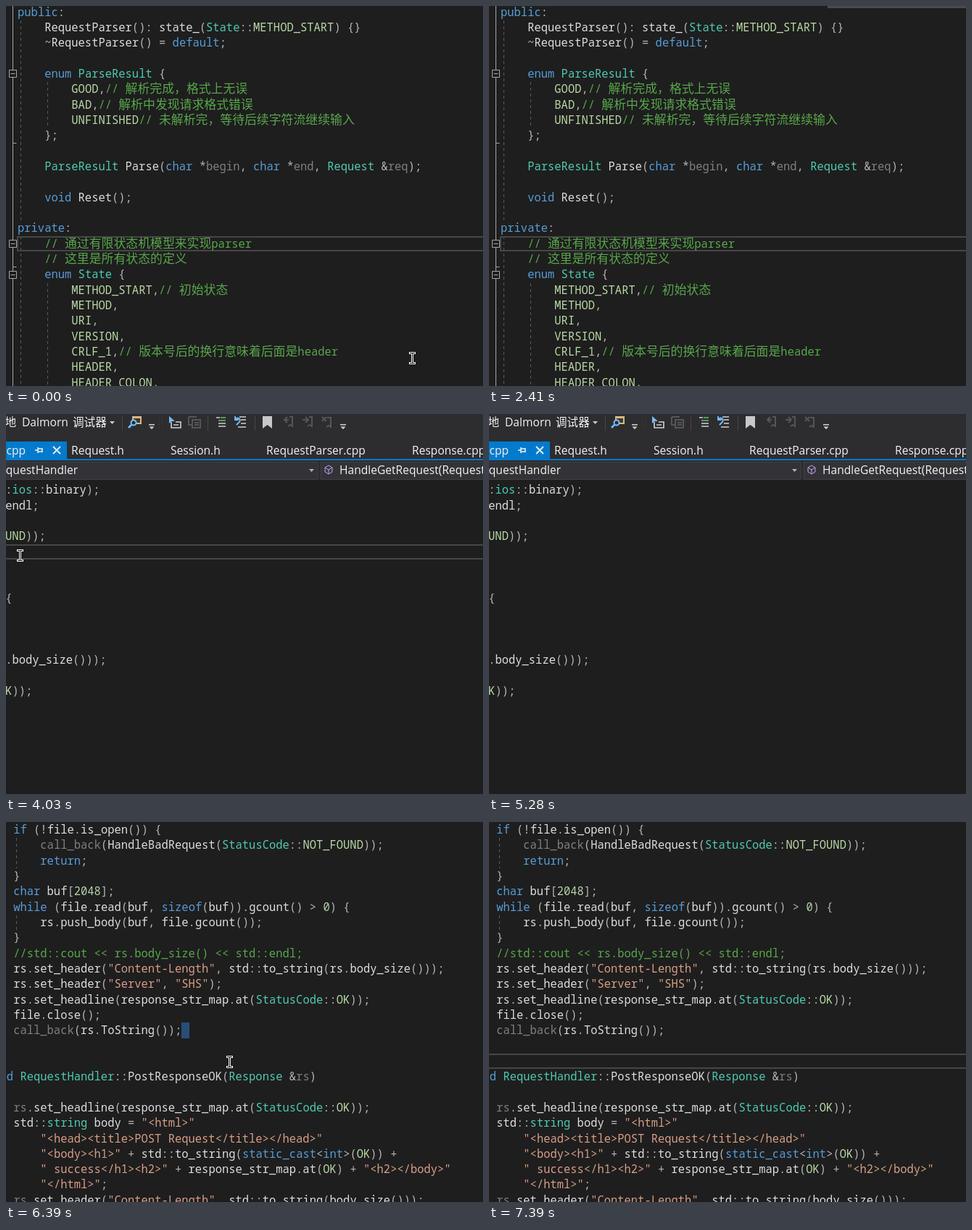
Animation, 658 px wide and 525 px high, one loop 7.94 s. Source, as an HTML page:

```html
<!DOCTYPE html>
<html lang="zh-CN">
<head>
<meta charset="utf-8">
<title>Code editor tour</title>
<style>
  html, body { margin: 0; width: 100%; height: 100%; overflow: hidden; background: #1e1e1e; }
  svg { display: block; }
  .code text { font: 15.48px "Noto Sans Mono", "DejaVu Sans Mono", monospace; fill: #dcdcdc; }
  .code .cjk { font: 16.87px "Noto Sans CJK SC", "Noto Sans CJK JP", sans-serif; }
  .comment { fill: #57a64a; }
  .string { fill: #d69d85; }
  .param { fill: #7f7f7f; }
  .keyword { fill: #569cd6; }
  .number { fill: #b5cea8; }
  .constant { fill: #b8d7a3; }
  .type { fill: #4ec9b0; }
  .op { fill: #b4b4b4; }
  .guide { stroke: #5c5c5c; stroke-dasharray: 4 4; }
  .fold { stroke: #a5a5a5; fill: #1e1e1e; }
  .row { fill: none; stroke: #464646; stroke-width: 2; }
  .ui text { font: 15.6px "Open Sans", "Noto Sans CJK SC", "Noto Sans CJK JP", sans-serif; fill: #f1f1f1; }
  .dim { fill: none; stroke: #55555a; stroke-width: 2; }
  .sep { stroke: #46464a; }
</style>
</head>
<body>
<svg width="658" height="525" viewBox="0 0 658 525">
  <rect width="658" height="525" fill="#1e1e1e"/>
  <g id="parser" class="code"></g>
  <g id="server" class="code"></g>
  <g id="handler" class="code"></g>

  <g id="chrome" class="ui">
    <rect width="658" height="91" fill="#2d2d30"/>
    <text x="-17" y="17">本地</text>
    <text x="22" y="17">Dalmorn</text>
    <text x="92" y="17">调试器</text>
    <path d="M143 10h7l-3.500 4z" fill="#c8c8c8"/>
    <path class="sep" d="M160.500 2v21M278.500 2v21M343.500 2v21"/>
    <!-- find in files -->
    <path d="M174 3h13v11h-13z" fill="#dcb67a"/>
    <path d="M176 6h9v6h-9z" fill="#3b3b3f"/>
    <circle cx="176" cy="12" r="3.500" fill="#2d2d30" stroke="#75beff" stroke-width="2"/>
    <path d="M173 15l-4 4" stroke="#75beff" stroke-width="2.500"/>
    <path id="more" d="M197 14h8v1.500h-8zM197.500 17.500h7l-3.500 3.500z" fill="#d0d0d0"/>
    <use href="#more" x="264"/>
    <path d="M211.500 2v20M215.500 4v18" stroke="#46464a" stroke-dasharray="1 3"/>
    <!-- cursor tools -->
    <path d="M225 3l8 7h-4.500l-3.500 3z" fill="#75beff"/>
    <path d="M228 11v8h13v-8h-7M231 15h7" fill="none" stroke="#d0d0d0" stroke-width="1.600"/>
    <path class="dim" d="M252 4h11M252 4v11h4M257 8h11v11h-11zM260 12h6M260 15h6"/>
    <path d="M290 5h5M293 13h10M293 17h10" stroke="#d0d0d0" stroke-width="1.700"/>
    <path d="M296 5h7M293 9h10" stroke="#6cc06c" stroke-width="1.700"/>
    <path d="M322 4h9M324 8h7M324 13h7M320 18h11" stroke="#d0d0d0" stroke-width="1.700"/>
    <path d="M316 3v5h5M316 8c3-5 9-1 6 3l-4 4" fill="none" stroke="#75beff" stroke-width="1.800"/>
    <!-- bookmarks -->
    <path d="M354 3h13v17l-6.500-5-6.500 5z" fill="#c8c8c8"/>
    <path class="dim" d="M388 4l-4 4 4 4M384 8h6M391 4h4v13l-3-2-3 2"/>
    <path class="dim" d="M413 4l4 4-4 4M409 8h8M418 4h4v13l-3-2-3 2"/>
    <path class="dim" d="M436 4l6 6M442 4l-6 6M443 5h5v13l-3-2-3 2"/>
    <!-- tabs -->
    <path d="M0 38h84v24h-84z" fill="#007acc"/>
    <path d="M0 62h658v2h-658z" fill="#007acc"/>
    <text x="27" y="56" text-anchor="end">RequestHandler.cpp</text>
    <path d="M40 50h4M44 46v8M44 48h6v4h-6M50 47v6" fill="none" stroke="#e8f3fb" stroke-width="1.500"/>
    <path d="M65 45l10 10M75 45l-10 10" stroke="#e8f3fb" stroke-width="1.800"/>
    <text x="90" y="56">Request.h</text>
    <text x="227" y="56">Session.h</text>
    <text x="359" y="56">RequestParser.cpp</text>
    <text x="560" y="56">Response.cpp</text>
    <!-- navigation bar -->
    <path d="M-2 66.500h432v24h-432zM434.500 66.500h230v24h-230z" fill="#333337" stroke="#3f3f46"/>
    <text x="99" y="83" text-anchor="end">RequestHandler</text>
    <path d="M418 76h7l-3.500 4z" fill="#b0b0b0"/>
    <path d="M445 71l5 3v6l-5 3-5-3v-6zM440 74l5 3 5-3M445 77v6" fill="#3b3350" stroke="#b9a6d8"/>
    <text x="460" y="83">HandleGetRequest(Request &amp;rq)</text>
  </g>

  <rect id="tip" x="467" width="191" height="3" fill="#4b4b4f"/>
  <g id="beam" fill="none">
    <path d="M-4-6.500h9M.5-7v15M-4 7.500h9" stroke="#fff" stroke-width="3"/>
    <path d="M-3-6.500h7M.5-7v15M-3 7.500h7" stroke="#111"/>
  </g>
</svg>

<script>
const LOOP = 7940, PITCH = 21.33, CHAR = 9.29;
const $ = id => document.getElementById(id);
const esc = s => s.replace(/&/g, '&amp;').replace(/</g, '&lt;');
const CLASSES = ['comment', 'string', 'param', 'keyword', 'number', 'constant', 'type', 'op'];
const KEYWORDS = 'public|private|default|enum|char|void|if|for|int|static_cast|static|return|while|sizeof';

// Highlights one line; a leading @ marks a parameter name.
function paint(line, types) {
  const token = new RegExp(
    `(//.*)|("[^"]*")|@(\\w+)|\\b(${KEYWORDS})\\b|\\b(\\d+)\\b|\\b([A-Z][A-Z_\\d]+)\\b|\\b(${types})\\b|([^\\w\\s])`, 'g');
  let out = '', last = 0;
  for (const m of line.matchAll(token)) {
    const i = m.slice(1).findIndex(g => g !== undefined);
    const body = esc(m[i + 1]).replace(/[\u3000-\u9fff\uff00-\uffef]+/g, s => `<tspan class="cjk">${s}</tspan>`);
    out += esc(line.slice(last, m.index)) + `<tspan class="${CLASSES[i]}">${body}</tspan>`;
    last = m.index + m[0].length;
  }
  return out + esc(line.slice(last));
}

// Baselines sit on whole pixels, as in the editor.
const code = (x, top, src, types) => src.slice(1).split('\n').map((line, r) => {
  const text = line.trimStart(), indent = line.length - text.length;
  return `<text x="${x + indent * CHAR}" y="${Math.round(top + 15.6 + r * PITCH)}">${paint(text, types)}</text>`;
}).join('');

const guide = (x, y1, y2) => `<path class="guide" d="M${x} ${y1}V${y2}"/>`;

function folds(x, y1, y2, boxes, ticks) {
  return `<path class="fold" d="M${x} ${y1}V${y2}"/>` +
    ticks.map(y => `<path class="fold" d="M${x} ${y}h5"/>`).join('') +
    boxes.map(y => `<path class="fold" d="M${x - 5} ${y - 5}h10v10h-10zM${x - 3} ${y}h6"/>`).join('');
}

$('parser').innerHTML =
  guide(20.5, 20, 296) + guide(20.5, 318, 525) + guide(57.5, 105, 167) + guide(57.5, 383, 525) +
  folds(9.5, 0, 525, [93.5, 328.5, 371.5], [189.5, 360.5]) +
  '<path class="row" d="M660 319H16V338H660"/>' + code(16, -2, `
public:
    RequestParser(): state_(State::METHOD_START) {}
    ~RequestParser() = default;

    enum ParseResult {
        GOOD,// 解析完成，格式上无误
        BAD,// 解析中发现请求格式错误
        UNFINISHED// 未解析完，等待后续字符流继续输入
    };

    ParseResult Parse(char *@begin, char *@end, Request &@req);

    void Reset();

private:
    // 通过有限状态机模型来实现parser
    // 这里是所有状态的定义
    enum State {
        METHOD_START,// 初始状态
        METHOD,
        URI,
        VERSION,
        CRLF_1,// 版本号后的换行意味着后面是header
        HEADER,
        HEADER_COLON,`, 'ParseResult|State|Request') +
  '<path id="caret" d="M339 318h2v20h-2z" fill="#dcdcdc"/>';

$('server').innerHTML =
  guide(20.5, 84, 296) + guide(20.5, 320, 338) + guide(57.5, 105, 211) + guide(95.5, 127, 189) +
  folds(9.5, 0, 360, [8.5, 50.5, 93.5, 115.5], [40.5, 211.5, 232.5, 318.5, 360.5]) + code(16, -2, `
// 轮转调度线程来分配任务
// 这里还为每个线程绑定了一个RequestHandler来消除锁
std::tuple<IO_Ctx_Ptr, Rh_Ptr> Server::get_io_context()
{
    if (io_contexts_.empty()) {
        for (int i = 0; i < nr_threads_; ++i) {
            io_contexts_.push_back(std::make_shared<boost::asio::io_context>());
            handlers_.push_back(std::make_shared<RequestHandler>());
            works_.push_back(boost::asio::make_work_guard(*io_contexts_[i]));
        }
    }
    static int count = -1;
    if (++count >= io_contexts_.size()) count = 0;
    return std::make_tuple(io_contexts_[count], handlers_[count]);
}

}// namespace http`, 'none');

$('handler').innerHTML =
  guide(14.5, 22, 64) + guide(14.5, 129, 150) + guide(-22.5, -42, 298) + guide(-22.5, 384, 525) +
  folds(-33.5, -42, 525, [10.5, 117.5, 352.5], [80.5, 165.5, 315.5]) +
  '<path id="row" class="row" d="M1200 1H-27V20H1200"/>' +
  '<path id="pick" d="M242 277h11v22h-11z" fill="#264f78"/>' +
  code(-27, 0.3 - 2 * PITCH, `
    std::ifstream file(full_path, std::ios::in | std::ios::binary);
    std::cout << "open files: " << full_path << std::endl;
    if (!file.is_open()) {
        @call_back(HandleBadRequest(StatusCode::NOT_FOUND));
        return;
    }
    char buf[2048];
    while (file.read(buf, sizeof(buf)).gcount() > 0) {
        rs.push_body(buf, file.gcount());
    }
    //std::cout << rs.body_size() << std::endl;
    rs.set_header("Content-Length", std::to_string(rs.body_size()));
    rs.set_header("Server", "SHS");
    rs.set_headline(response_str_map.at(StatusCode::OK));
    file.close();
    @call_back(rs.ToString());
}

void RequestHandler::PostResponseOK(Response &@rs)
{
    @rs.set_headline(response_str_map.at(StatusCode::OK));
    std::string body = "<html>"
        "<head><title>POST Request</title></head>"
        "<body><h1>" + std::to_string(static_cast<int>(OK)) +
        " success</h1><h2>" + response_str_map.at(OK) + "<h2></body>"
        "</html>";
    @rs.set_header("Content-Length", std::to_string(body_size()));`,
  'StatusCode|RequestHandler|Response|string|ifstream|ios');

// Pointer strokes: start, end, number of steps, then [step, x, y] waypoints.
const strokes = [
  [70, 230, 3, [[0, 560, 486], [2, 313, 13], [3, 313, -30]]],
  [3650, 4030, 6, [[0, -20, 50], [1, 24, 46], [3, 45, 100], [6, 19, 195]]],
  [4200, 4980, 11, [[0, 19, 195], [3, 60, 123], [7, 80, 212], [11, 40, 299]]],
  [5050, 5280, 4, [[0, 40, 299], [3, 6, 303], [4, -20, 303]]],
  [6000, 6770, 11, [[0, 330, -30], [1, 320, 8], [4, 252, 288], [6, 308, 331], [9, 420, 500], [11, 480, 560]]],
  [6850, 7390, 8, [[0, 480, 560], [1, 470, 510], [3, 300, 200], [5, 200, 331], [8, 60, 560]]]
];

function pointer(t) {
  const [t0, t1, n, path] = strokes.filter(s => t >= s[0]).pop() || strokes[0];
  const step = t < t0 ? 0 : Math.min(n, 1 + Math.floor((t - t0) * (n - 1) / (t1 - t0) + 0.01));
  const i = Math.max(1, path.findIndex(p => p[0] >= step));
  const [a, b] = [path[i - 1], path[i]];
  const k = (step - a[0]) / (b[0] - a[0]);
  return [1, 2].map(j => Math.round(a[j] + (b[j] - a[j]) * k));
}

// Latest value in a [time, value] list.
const at = (list, t) => list.filter(e => t >= e[0]).pop()[1];
const views = [[0, 'parser'], [850, 'server'], [1480, 'parser'], [2490, 'handler']];
const pans = [[0, '43 40'], [2870, '-466 137'], [5800, '0 0']];
const rows = [[0, null], [3950, 2], [4510, 3], [5125, null], [6230, 13], [6305, null], [7155, 15]];
const show = (id, on) => $(id).setAttribute('display', on ? 'inline' : 'none');
const within = (t, a, b) => t >= a && t < b;

function draw(now) {
  const t = Math.max(0, now - start) % LOOP;
  const view = at(views, t), row = at(rows, t);
  for (const id of ['parser', 'server', 'handler']) show(id, id === view);
  $('handler').setAttribute('transform', `translate(${at(pans, t)})`);
  show('chrome', within(t, 2870, 5800));
  show('caret', within(t, 1480, 2030));
  show('tip', within(t, 2410, 2490));
  show('row', row !== null);
  $('row').setAttribute('transform', `translate(0 ${Math.round(row * PITCH)})`);
  show('pick', within(t, 6305, 7155));
  $('beam').setAttribute('transform', `translate(${pointer(t)})`);
  requestAnimationFrame(draw);
}
const start = performance.now();
draw(start);
</script>
</body>
</html>
```
